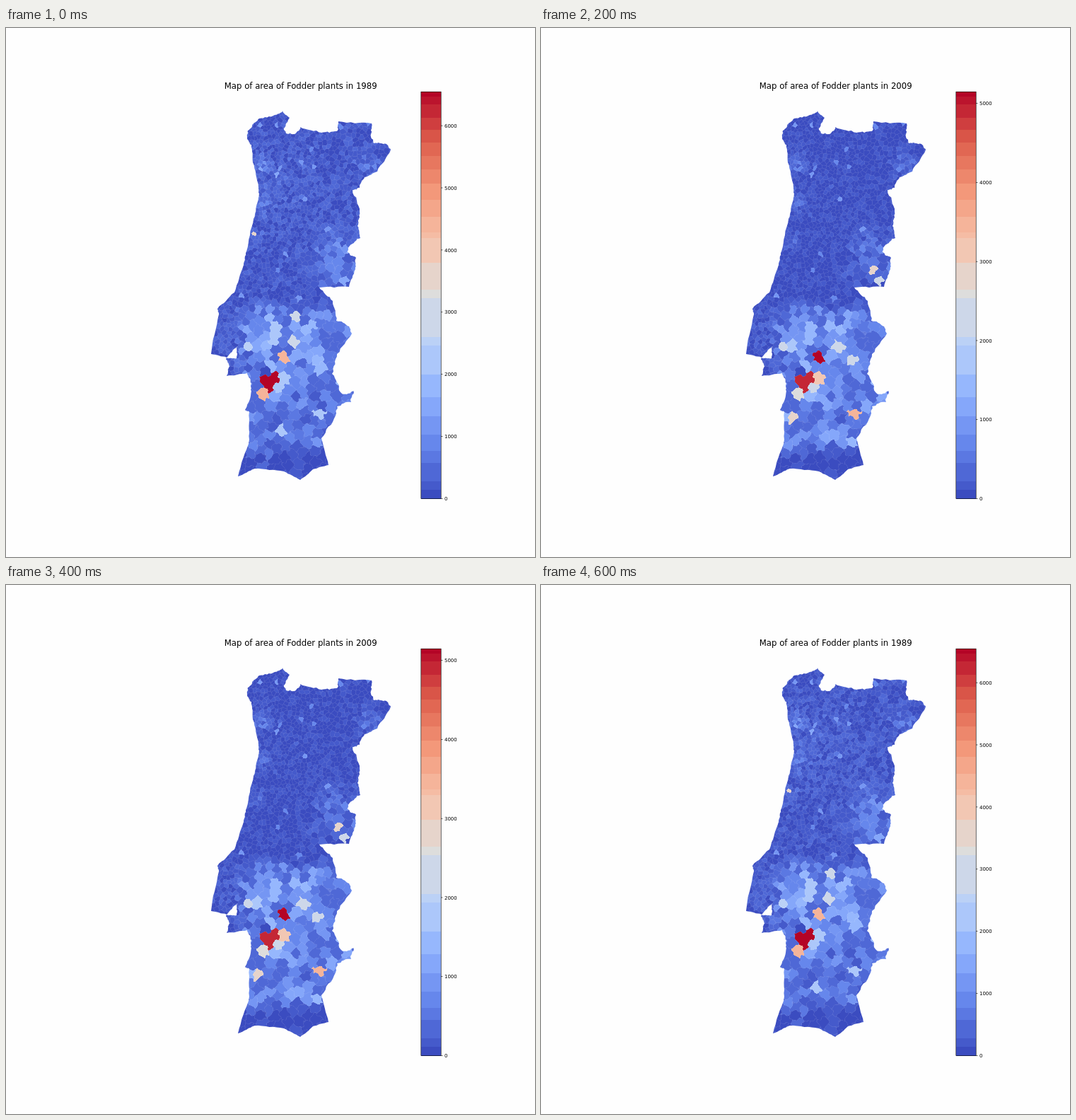
An HTML page with a canvas that plays this animation: 748 by 748 pixels, repeating every 0.7 s.

```html
<!DOCTYPE html>
<html lang="en">
<head>
<meta charset="utf-8">
<title>Fodder plants map</title>
<style>
html, body { margin: 0; width: 100%; height: 100%; overflow: hidden; background: #fefefe; }
canvas { display: block; }
</style>
</head>
<body>
<canvas id="stage" width="748" height="748"></canvas>
<script>
const SIZE = 748, FONT = '"DejaVu Sans", sans-serif';
const years = [1989, 1999, 2009, 2019], maxima = [6545, 5772, 5147, 8250];
const order = [0, 1, 2, 3, 2, 1, 0];
const bar = { x: 587, y: 90.2, w: 28, h: 575.3 };
const box = { x: 286, y: 112, w: 262, h: 532 };

let seed = 7;
const rand = () => {
  seed = (seed + 0x6D2B79F5) | 0;
  let t = Math.imul(seed ^ (seed >>> 15), 1 | seed);
  t = (t + Math.imul(t ^ (t >>> 7), 61 | t)) ^ t;
  return ((t ^ (t >>> 14)) >>> 0) / 4294967296;
};
const ramp = (v, a, b) => Math.min(1, Math.max(0, (v - a) / (b - a)));
const newCanvas = (w, h) => Object.assign(document.createElement('canvas'), { width: w, height: h });

// Colour scale: a diverging gradient cut into uneven bands (percent of the maximum)
const stops = [[59,76,192], [98,130,234], [141,176,254], [184,208,249], [221,221,221],
  [245,196,173], [244,154,123], [222,96,77], [180,4,38]];
const cuts = [0, 2.1, 4.3, 8.7, 11.8, 15.8, 20.2, 25, 30.5, 37.6, 39.7, 49.2, 51.3, 57.9, 64,
  65.5, 69.2, 73.4, 77.4, 80.9, 84.3, 87.5, 90.6, 93.6, 96.9, 98.8, 100];
const gradient = t => {
  const i = Math.min(7, Math.floor(t * 8)), f = t * 8 - i;
  return stops[i].map((c, n) => Math.round(c + (stops[i + 1][n] - c) * f));
};
const bands = cuts.slice(1).map((hi, i) =>
  gradient(i === 0 ? 0 : hi === 100 ? 1 : (cuts[i] + hi) / 200));
const colour = p => bands[Math.max(0, cuts.findLastIndex(cut => cut <= Math.min(p, 99.9)))];

// Key points of the outline; a zigzag of limited size (px) roughens each side
const coast = `342,145 341,157 347,165 349,190 357,225 357,240 350,270 340,316 336,335 323,374
  299,397 301,405 290,461 312,466 327,450 326,467 311,467 316,478 312,492 341,488 347,503
  346,520 338,540 344,543 344,582 328,634 352,623 393,627 416,639 434,624 456,618`;
const frontier = `446,580 466,548 468,535 488,529 491,513 481,518 473,515 461,489 468,461 489,432
  485,422 467,414 462,386 443,367 485,366 494,341 495,325 483,317 486,308 501,297 497,280
  500,260 490,229 500,226 507,211 525,203 544,172 538,164 520,163 516,154 517,135 470,132
  468,146 446,148 416,140 407,150 396,149 393,142 401,127 391,117 380,123 358,128 348,137`;
const parse = (side, rough) => side.split(/\s+/).map(p => [...p.split(',').map(Number), rough]);
const zigzag = line => line.flatMap(([x, y, rough], i) => {
  const [nx, ny] = line[(i + 1) % line.length], length = Math.hypot(nx - x, ny - y);
  const k = (rand() - .5) * 2 * Math.min(rough / length, .2);
  return [[x, y, rough], [(x + nx) / 2 + (ny - y) * k, (y + ny) / 2 - (nx - x) * k, rough]];
});
const border = new Path2D();
zigzag(zigzag(zigzag([...parse(coast, .7), ...parse(frontier, 1.5)])))
  .forEach(([x, y]) => border.lineTo(x, y));
border.closePath();

// Regions that stand out: centre, radius, percent of the maximum per year
const regions = [
  [367, 486, 0, 2, 2, 2, 2],
  [367, 497, 13, 100, 71, 95, 83],
  [391, 466, 9, 68, 100, 100, 55],
  [364, 516, 7, 68, 55, 50, 29],
  [406, 443, 7, 45, 28, 18, 100],
  [408, 407, 8, 47, 33, 20, 32],
  [380, 432, 13, 33, 30, 25, 16],
  [341, 450, 7, 38, 54, 45, 15],
  [384, 508, 7, 36, 34, 45, 22],
  [392, 495, 0, 34, 34, 61, 20],
  [443, 546, 9, 36, 45, 67, 36],
  [469, 343, 0, 14, 52, 56, 33],
  [478, 357, 8, 22, 44, 44, 14],
  [439, 470, 0, 27, 44, 44, 33],
  [421, 450, 7, 20, 35, 44, 34],
  [389, 570, 0, 35, 18, 15, 46],
  [356, 552, 0, 15, 23, 55, 36],
  [350, 291, 0, 53, 3, 3, 3]
];

// Mean value of an ordinary parish in year k: low in the north, high on the southern plains
const hill = (x, y, cx, cy, r) => Math.exp(-((x - cx) ** 2 + (y - cy) ** 2) / (2 * r * r));
const mean = (x, y, k) => {
  const plain = ramp(y, 382, 412) * ramp(y, 608, 585) * ramp(x, 320, 350);
  const drop = ramp(y, 490, 530) * (k < 2 ? 6 : 1);
  return 2.6 - .5 * k + plain * (13 - drop)
    + (12 - 2 * k) * hill(x, y, 472, 328, 24)
    + 6 * hill(x, y, 512, 192, 13)
    + 8 * (hill(x, y, 358, 193, 9) + hill(x, y, 361, 248, 8) + hill(x, y, 352, 300, 7))
    + 2.5 * hill(x, y, 315, 430, 22)
    + 2.5 / (1 + 2 * k) * hill(x, y, 390, 225, 45);
};
const value = (x, y, k, m) => mean(x, y, k) * (.3 + 2.1 * m * m);

// Parish spacing: dense in the north and west, wide in the south
const spacing = (x, y) => {
  const inland = 4 * ramp(x, 425, 450) * ramp(y, 295, 325);
  const wide = 6.2 * ramp(y, 375, 415) * ramp(x, 325, 350);
  return 4.1 + .9 * ramp(x, 430, 480) + .5 * ramp(y, 290, 320) + Math.max(inland, wide);
};

const STEP = 16, grid = new Map();
const key = (x, y) => Math.floor(x / STEP) * 100 + Math.floor(y / STEP);
const addSite = (x, y, id) => {
  const k = key(x, y);
  if (!grid.has(k)) grid.set(k, []);
  grid.get(k).push([x, y, id]);
};
// Nearest parish, its distance, and how much farther the next parish is
const nearest = (x, y) => {
  let d1 = 1e9, d2 = 1e9, id = -1;
  for (let i = -1; i < 2; i++) for (let j = -1; j < 2; j++)
    for (const s of grid.get(key(x + i * STEP, y + j * STEP)) || []) {
      const d = Math.hypot(s[0] - x, s[1] - y);
      if (d < d1) {
        if (s[2] !== id) d2 = d1;
        d1 = d;
        id = s[2];
      } else if (s[2] !== id && d < d2) d2 = d;
    }
  return { id, d1, gap: d2 - d1 };
};

const parishes = regions.map(([x, y, , ...values], id) => {
  addSite(x, y, id);
  return values;
});
for (let n = 0; n < 42000; n++) {
  const x = box.x + rand() * box.w, y = box.y + rand() * box.h;
  if (nearest(x, y).d1 < spacing(x, y)) continue;
  const region = regions.findIndex(([cx, cy, r]) => Math.hypot(x - cx, y - cy) < r);
  addSite(x, y, region < 0 ? parishes.length : region);
  if (region >= 0) continue;
  const own = rand(), bonus = rand() < .008 ? 14 : 0;
  parishes.push(years.map((_, k) => bonus + value(x, y, k, .75 * own + .25 * rand())));
}

// Parish and seam strength of every pixel, with wavy seams
const cells = [];
for (let y = 0; y < box.h; y++) for (let x = 0; x < box.w; x++) {
  const px = box.x + x + .5, py = box.y + y + .5, wave = spacing(px, py) / 8;
  const { id, gap } = nearest(px + wave * Math.sin(py * .6 + 2 * Math.sin(px * .23)),
    py + wave * Math.sin(px * .55 + 2 * Math.sin(py * .27)));
  cells.push([id, .12 * Math.max(0, 1 - gap / 1.4)]);
}

function drawMap(k) {
  const canvas = newCanvas(box.w, box.h), c = canvas.getContext('2d');
  const image = c.createImageData(box.w, box.h);
  const fills = parishes.map(values => colour(values[k]));
  cells.forEach(([id, seam], i) => {
    const rgb = fills[id] || bands[0];
    for (let n = 0; n < 3; n++) image.data[i * 4 + n] = rgb[n] + (255 - rgb[n]) * seam;
    image.data[i * 4 + 3] = 255;
  });
  c.putImageData(image, 0, 0);
  return canvas;
}

function drawBar(c, max) {
  const yAt = p => bar.y + bar.h * (1 - p);
  bands.forEach((rgb, i) => {
    const top = Math.round(yAt(cuts[i + 1] / 100)), bottom = Math.round(yAt(cuts[i] / 100));
    c.fillStyle = `rgb(${rgb})`;
    c.fillRect(bar.x, top, bar.w, bottom - top);
  });
  c.strokeStyle = c.fillStyle = '#000';
  c.lineWidth = .6;
  c.strokeRect(bar.x - .2, bar.y, bar.w + .4, bar.h);
  c.font = `6.93px ${FONT}`;
  c.textAlign = 'left';
  for (let v = 0; v <= max; v += 1000) {
    const y = yAt(v / max);
    c.fillRect(bar.x + bar.w, y - .3, 2.5, .6);
    c.fillText(v, 620, y + 2.6);
  }
}

const pages = years.map((year, k) => {
  const canvas = newCanvas(SIZE, SIZE), c = canvas.getContext('2d');
  c.fillStyle = '#fefefe';
  c.fillRect(0, 0, SIZE, SIZE);
  c.save();
  c.clip(border);
  c.drawImage(drawMap(k), box.x, box.y);
  c.restore();
  c.fillStyle = '#000';
  c.font = `11.7px ${FONT}`;
  c.textAlign = 'center';
  c.fillText(`Map of area of Fodder plants in ${year}`, 416.7, 86);
  drawBar(c, maxima[k]);
  return canvas;
});

const stage = document.getElementById('stage').getContext('2d');
function draw() {
  stage.drawImage(pages[order[Math.floor(performance.now() / 100) % order.length]], 0, 0);
  requestAnimationFrame(draw);
}
draw();
</script>
</body>
</html>
```
